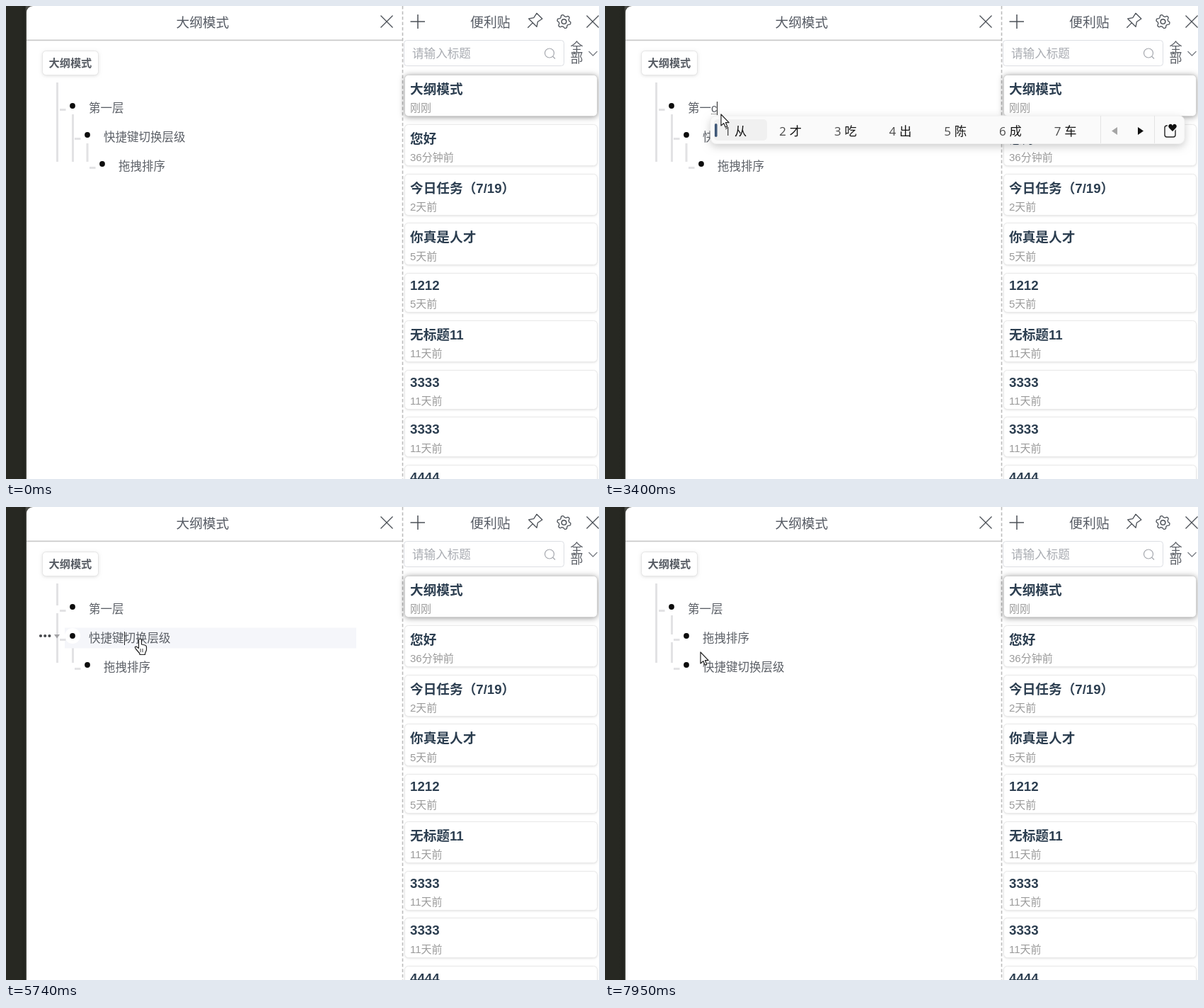
An HTML page with a canvas for the animation above (8000 ms loop, 838 by 668 pixels).

```html
<!DOCTYPE html>
<html lang="zh">
<head>
<meta charset="utf-8">
<title>大纲模式</title>
<style>
html, body { margin: 0; width: 100%; height: 100%; overflow: hidden; background: #fff; }
canvas { display: block; }
</style>
</head>
<body>
<canvas id="stage" width="838" height="668"></canvas>
<script>
const ctx = document.getElementById('stage').getContext('2d');
const LOOP = 8000;
const FONT = '"Liberation Sans", "Noto Sans CJK SC", "Noto Sans CJK", sans-serif';
const IME_FONT = '"Open Sans", "Noto Sans CJK SC", "Noto Sans CJK", sans-serif';
const INK = '#4b5057', BODY = '#5c6067', LINE = '#e2e2e4', HOVER = '#f5f6fa';
const ROW_SIZE = 16.5, INDENT = 21, ROW_TOPS = [130, 171, 212];

// Row one while it is edited: time, committed text, composition, candidates
const EDITS = [
  [0, '第一层'], [1400, '第一'], [1600, '第'], [1740, ''],
  [2470, '', 'd', '的 都 对 等 到 但 点'],
  [2740, '', 'di', '第 地 低 底 敌 弟 帝'],
  [2800, '', "di'y", '第一 地狱 抵押 第 地 低 底'],
  [2870, '', "di'yi", '第一 敌意 低 地 第 底 弟'],
  [3200, '第一'],
  [3400, '第一', 'c', '从 才 吃 出 陈 成 车'],
  [3600, '第一', 'ce', '测 侧 册 策 厕 恻 参'],
  [3740, '第一', 'cen', '岑 参 涔 层 曾 曾经 层次'],
  [3800, '第一', 'ceng', '层 曾 蹭 噌 嶒 曾经 层次'],
  [4270, '第一层']
];
const POINTER = [
  [70, 735, 645], [740, 164, 153], [4940, 164, 153], [5330, 188, 186],
  [6150, 188, 186], [6290, 203, 186], [6620, 153, 225], [6890, 136, 224],
  [6960, 136, 224], [7420, 157, 160], [7620, 157, 160], [7950, 135, 205]
];
const CARDS = [
  [97, 59, '大纲模式', '刚刚'], [167, 59, '您好', '36分钟前'],
  [237, 59, '今日任务（7/19）', '2天前'], [306, 60, '你真是人才', '5天前'],
  [377, 56, '1212', '5天前'], [444, 59, '无标题11', '11天前'],
  [514, 56, '3333', '11天前'], [580, 57, '3333', '11天前'], [648, 57, '4444', '']
];
const ARROW = new Path2D('M0 0V16L3.8 12.6L6.3 18.2L8.8 17.1L6.4 11.6H11.2Z');
const HAND = new Path2D('M-.5 1.5Q1.5-1 3.5 1.5V8L8 9Q10.5 9.5 10.5 12V16L8.5 21V22.5H1V21L-4.5 14.5Q-7 11-4 11L-.5 13.5Z');
const HEART = new Path2D('M0 5L-5 0Q-7-3-4-5Q-1-6 0-3Q1-6 4-5Q7-3 5 0Z');
const PIN = new Path2D('M-5.5-10.5H5.5L4-3L8 3H-8L-4-3ZM0 3V13');
const GEAR = new Path2D();
for (let i = 0; i <= 60; i++) {
  const a = i / 60 * Math.PI * 2, r = 8.4 + 1.3 * Math.tanh(2 * Math.sin(6 * a));
  GEAR.lineTo(r * Math.cos(a), r * Math.sin(a));
}

function setFont(size, weight = 400, family = FONT) { ctx.font = `${weight} ${size}px ${family}`; }

// y is the visual middle of the glyphs
function text(str, x, y, size, color, weight, family) {
  setFont(size, weight, family);
  ctx.fillStyle = color;
  ctx.fillText(str, x, y + size * 0.37);
}

function textWidth(str, size) { setFont(size); return ctx.measureText(str).width; }

function rect(x, y, w, h, color) { ctx.fillStyle = color; ctx.fillRect(x, y, w, h); }

function disc(x, y, r, color) {
  ctx.fillStyle = color;
  ctx.beginPath();
  ctx.arc(x, y, r, 0, Math.PI * 2);
  ctx.fill();
}

function poly(points, color, { width = 1.3, fill = false } = {}) {
  ctx.beginPath();
  for (let i = 0; i < points.length; i += 2) ctx.lineTo(points[i], points[i + 1]);
  if (fill) { ctx.fillStyle = color; ctx.fill(); return; }
  ctx.strokeStyle = color;
  ctx.lineWidth = width;
  ctx.stroke();
}

function panel(x, y, w, h, radius, fill, border, shadow, blur, drop = 1) {
  ctx.save();
  ctx.beginPath();
  ctx.roundRect(x, y, w, h, radius);
  ctx.shadowColor = shadow;
  ctx.shadowBlur = blur;
  ctx.shadowOffsetY = drop;
  ctx.fillStyle = fill;
  ctx.fill();
  ctx.shadowColor = 'transparent';
  ctx.strokeStyle = border;
  ctx.lineWidth = 1;
  ctx.stroke();
  ctx.restore();
}

function icon(path, x, y, angle = 0) {
  ctx.save();
  ctx.translate(x, y);
  ctx.rotate(angle);
  ctx.strokeStyle = INK;
  ctx.lineWidth = 1.3;
  ctx.lineJoin = 'round';
  ctx.stroke(path);
  ctx.restore();
}

function cross(x, y) {
  poly([x - 8.5, y - 8.5, x + 8.5, y + 8.5], INK);
  poly([x + 8.5, y - 8.5, x - 8.5, y + 8.5], INK);
}

function drawWindow() {
  const edge = ctx.createLinearGradient(20, 0, 29, 0);
  edge.addColorStop(0, '#272822');
  edge.addColorStop(.75, '#22231e');
  edge.addColorStop(1, '#4d4e49');
  rect(0, 0, 40, 668, edge);
  ctx.fillStyle = '#fff';
  ctx.beginPath();
  ctx.roundRect(29, 0, 820, 680, [9, 0, 0, 0]);
  ctx.fill();

  text('大纲模式', 240.5, 23, 18.7, '#565b64');
  cross(538, 22);
  rect(29, 47.5, 531, 1.7, '#c9c9c9');
  ctx.setLineDash([4.5, 3]);
  poly([560.5, 0, 560.5, 668], '#bcbcbc', { width: 1.6 });
  ctx.setLineDash([]);

  poly([571.5, 22, 592, 22], INK, { width: 1.5 });
  poly([582, 12, 582, 32], INK, { width: 1.5 });
  text('便利贴', 656, 23, 18.9, '#565b64');
  icon(PIN, 746.5, 21.5, Math.PI / 4);
  icon(GEAR, 788.5, 22);
  ctx.strokeStyle = INK;
  ctx.beginPath();
  ctx.arc(788.5, 22, 3.3, 0, 7);
  ctx.stroke();
  cross(829, 22);
}

function drawSidebar() {
  panel(562.5, 48.5, 226, 36, 4, '#fff', '#dcdee3', 'transparent', 0);
  text('请输入标题', 574, 67, 16.6, '#a9acb2');
  ctx.strokeStyle = '#a5a8ae';
  ctx.lineWidth = 1.2;
  ctx.beginPath();
  ctx.arc(768, 66.5, 6.5, 0, 7);
  ctx.moveTo(773, 71.5);
  ctx.lineTo(776, 74.5);
  ctx.stroke();
  text('全', 797.5, 58, 18, '#5d6168');
  text('部', 797.5, 73.5, 18, '#5d6168');
  poly([823.5, 64, 829.5, 70, 835.5, 64], '#7b7f86');

  CARDS.forEach(([y, h, title, age], i) => {
    panel(563.5, y + .5, 272, h - 1, 5, '#fff', i ? '#e9e9e9' : '#d2d2d2',
      i ? 'rgba(0,0,0,.13)' : 'rgba(0,0,0,.45)', i ? 3 : 9);
    text(title, 571, y + (/^\d/.test(title) ? 17 : 20.5), 18.66, '#2c3e50', 700);
    text(age, 571, y + h - 13, 15, '#9b9b9b');
  });
}

function bulletX(level) { return 94 + INDENT * (level - 1); }

function drawRow(row, top, hovered) {
  const x = bulletX(row.level), y = top + 11;
  if (hovered) {
    rect(83, top - .5, 412, 29, HOVER);
    disc(x, y, 11, '#fff');
    for (let i = 0; i < 3; i++) disc(x - 45 + i * 6.2, y, 2.1, '#47494d');
    if (!row.leaf) poly([x - 26, y - 2, x - 18, y - 2, x - 22, y + 3.5], '#a2a2a5', { fill: true });
  }
  rect(x - 18, top + 15, 8.5, 3, LINE);
  disc(x, y, 3.9, '#0c0c0c');
  text(row.text, x + 23, top + 14, ROW_SIZE, BODY);
}

function treeState(t, firstText) {
  const first = { text: firstText, level: 1 };
  const keys = { text: '快捷键切换层级', level: 2 };
  const drag = { text: '拖拽排序', level: 3, leaf: true };
  // guides: x, top, bottom
  if (t >= 7620) {
    drag.level = 2;
    keys.leaf = true;
    return { rows: [first, drag, keys], guides: [[72.5, 108, 220], [94.5, 153, 180], [94.5, 191, 220]] };
  }
  if (t >= 5740 && t < 6150) {
    keys.level = 1;
    drag.level = 2;
    first.leaf = true;
    return { rows: [first, keys, drag], guides: [[72.5, 108, 139], [72.5, 150, 220], [94.5, 194, 220]] };
  }
  return { rows: [first, keys, drag], guides: [[72.5, 108, 220], [94.5, 153, 220], [115, 194, 220]] };
}

function drawCaret(x, y) { rect(Math.round(x), y, 1, 19, '#222'); }

function drawCandidates(left, top, words) {
  const at = (dx, dy) => [left + dx, top + dy];
  panel(left, top, 670, 39.5, 8, '#fafafa', '#f0f0f0', 'rgba(0,0,0,.2)', 12, 4);
  ctx.fillStyle = '#f0f0f0';
  ctx.beginPath();
  ctx.roundRect(left + 5, top + 5, 75, 30, 5);
  ctx.fill();
  ctx.fillStyle = '#3f5878';
  ctx.beginPath();
  ctx.roundRect(left + 6, top + 11, 3.6, 19, 2);
  ctx.fill();
  let x = left + 19.5;
  words.split(' ').forEach((word, i) => {
    text(i + 1, x, top + 21.5, 17, '#4a4a4a', 400, IME_FONT);
    text(word, x + 14.5, top + 21.5, 17.3, '#151515', 400, IME_FONT);
    x += 77.7 + (word.length - 1) * 8;
  });
  rect(left + 551, top, 1, 39, '#e3e3e3');
  rect(left + 627, top, 1, 39, '#e3e3e3');
  poly([...at(575, 16), ...at(575, 27), ...at(567, 21.5)], '#a5a5a5', { fill: true });
  poly([...at(604, 16), ...at(604, 27), ...at(612, 21.5)], '#111', { fill: true });
  ctx.strokeStyle = '#222';
  ctx.lineWidth = 1.4;
  ctx.beginPath();
  ctx.roundRect(left + 642, top + 14, 15, 16, 3);
  ctx.stroke();
  ctx.save();
  ctx.translate(left + 653, top + 17);
  ctx.lineWidth = 3;
  ctx.strokeStyle = '#fafafa';
  ctx.stroke(HEART);
  ctx.fillStyle = '#111';
  ctx.fill(HEART);
  ctx.restore();
}

function pointerAt(t) {
  const next = POINTER.findIndex(key => key[0] > t);
  if (next === 0) return null;
  if (next < 0) return POINTER[POINTER.length - 1].slice(1);
  const [t0, x0, y0] = POINTER[next - 1], [t1, x1, y1] = POINTER[next];
  const p = (t - t0) / (t1 - t0), e = p * p * (3 - 2 * p);
  return [x0 + (x1 - x0) * e, y0 + (y1 - y0) * e];
}

function drawPointer([x, y], hand) {
  ctx.save();
  ctx.translate(x, y);
  ctx.fillStyle = '#fff';
  ctx.strokeStyle = '#222';
  ctx.lineWidth = 1.2;
  ctx.lineJoin = 'round';
  const shape = hand ? HAND : ARROW;
  ctx.fill(shape);
  ctx.stroke(shape);
  if (hand) for (const dx of [2, 5]) poly([dx, 14, dx, 19], '#222', { width: .9 });
  ctx.restore();
}

function drawGhost([x, y]) {
  ctx.save();
  ctx.globalAlpha = .6;
  ctx.translate(x - 136, y - 224);
  drawRow({ text: '拖拽排序', level: 3, leaf: true }, ROW_TOPS[2], true);
  ctx.restore();
}

function drawOutline(t, pointer) {
  panel(51.5, 63.5, 79, 34, 5, '#fff', '#e6e6e6', 'rgba(0,0,0,.14)', 5);
  text('大纲模式', 60.5, 80.5, 15.2, '#555a62', 700);

  const [, done, typing = '', words] = EDITS.filter(edit => edit[0] <= t).pop();
  const lift = done ? 0 : -2;
  const { rows, guides } = treeState(t, done);
  const composing = t >= 2470 && t < 4730, dragging = t >= 6960 && t < 7620;
  const hovered = !pointer || composing || dragging || pointer[0] > 495 ? -1
    : ROW_TOPS.findIndex(top => pointer[1] >= top && pointer[1] <= top + 29);

  for (const [x, top, bottom] of guides) {
    rect(x - 1.5, top, 3, bottom - top + lift, LINE);
  }
  rows.forEach((row, i) => drawRow(row, ROW_TOPS[i] + (i ? lift : 0), i === hovered));

  const start = 117 + textWidth(done, ROW_SIZE);
  const typingWidth = textWidth(typing, ROW_SIZE);
  if (typing) {
    text(typing, start, 143.5 + lift, ROW_SIZE, BODY);
    ctx.setLineDash([1, 1]);
    poly([start, 152.5 + lift, start + typingWidth, 152.5 + lift], '#555', { width: 1 });
    ctx.setLineDash([]);
  }

  const firstCaret = (t >= 740 && t < 1210) || (t >= 1400 && t < 2070) || (t >= 2470 && t < 4800);
  if (firstCaret) drawCaret(start + typingWidth, 135 + lift);
  if ((t >= 5330 && t < 5950) || (t >= 6150 && t < 6890)) {
    const index = t < 6290 ? 3 : 4;
    drawCaret(bulletX(rows[1].level) + 23 + index * ROW_SIZE, 176);
  }
  if (words) drawCandidates(typing.length > 2 && done ? 105 : start - 1, 155 + lift * 1.5, words);
  if (dragging) drawGhost(pointer);
  if (pointer) drawPointer(pointer, hovered >= 0 || pointer[0] > 564);
}

const begin = performance.now();
function frame(now) {
  const t = Math.max(0, now - begin) % LOOP;
  drawWindow();
  drawSidebar();
  drawOutline(t, pointerAt(t));
  requestAnimationFrame(frame);
}
requestAnimationFrame(frame);
</script>
</body>
</html>
```
